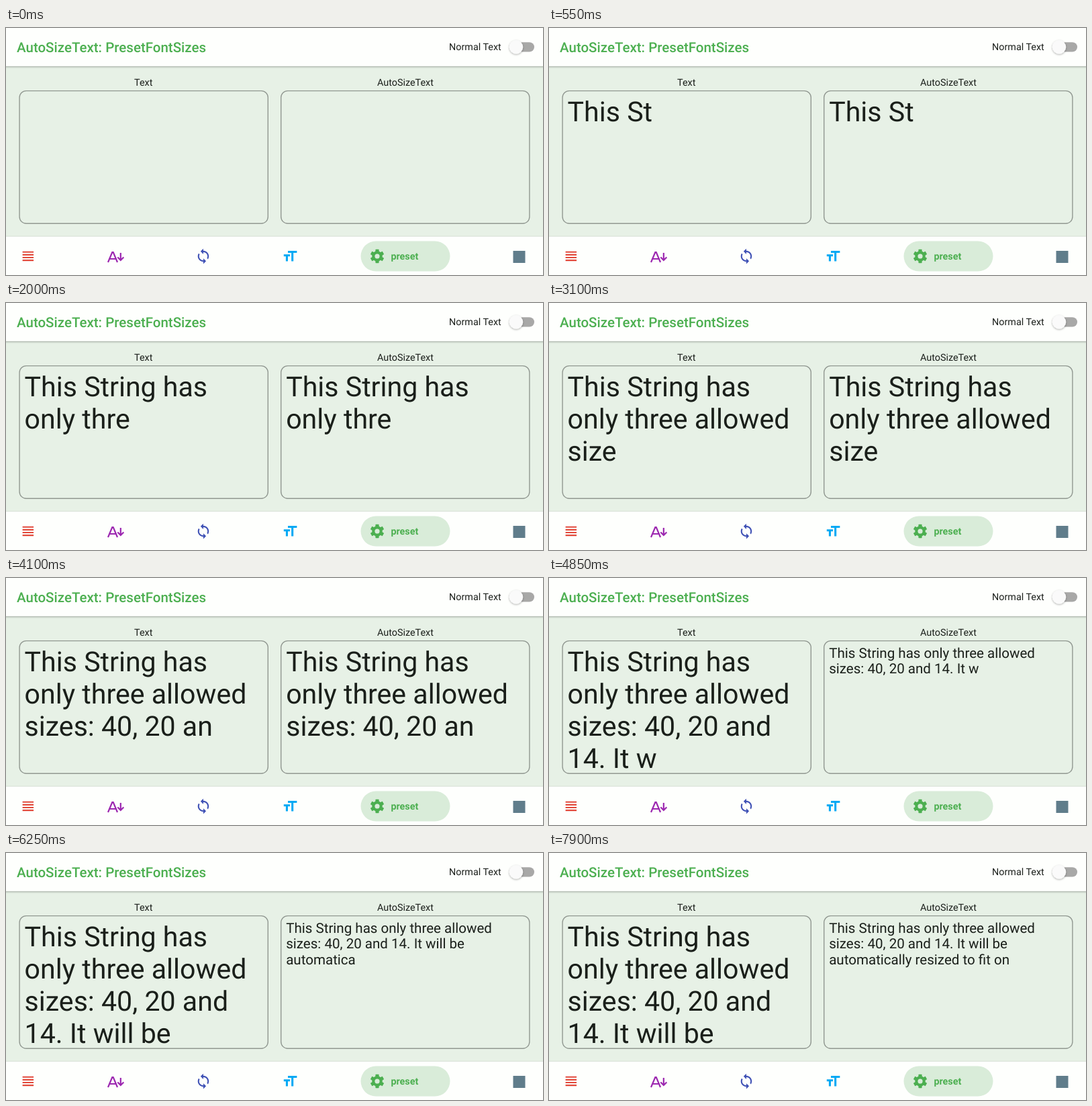
These frames come from a looping animation (800 by 368 pixels, 8 s). An HTML page:

```html
<!DOCTYPE html>
<html lang="en">
<head>
<meta charset="utf-8">
<title>AutoSizeText: PresetFontSizes</title>
<style>
html, body { margin: 0; width: 100%; height: 100%; overflow: hidden; background: #e7f1e6; }
body, svg text { font-family: Roboto, sans-serif; text-rendering: geometricPrecision; }
svg { position: absolute; left: 0; top: 0; }
svg text { font-size: 14.36px; fill: #1b1f1b; }
.typed {
  position: absolute; top: 101.5px; width: 354.7px; height: 189px;
  overflow: hidden; color: #1a1f1a; font-size: 41.1px; line-height: 48.2px;
}
.typed.small { font-size: 20.55px; line-height: 23.6px; }
#plain { left: 27.6px; }
#auto { left: 417.2px; }
</style>
</head>
<body>
<svg width="800" height="368" viewBox="0 0 800 368">
  <defs>
    <filter id="shadow" x="-20%" y="-50%" width="140%" height="200%">
      <feDropShadow dx="0" dy="1" stdDeviation="1.5" flood-opacity=".35"/>
    </filter>
  </defs>

  <rect x="-10" y="-20" width="820" height="76.8" fill="#fefffd" filter="url(#shadow)"/>
  <text x="16" y="36" style="font-size:20.5px;font-weight:500;fill:#4caf50">AutoSizeText: PresetFontSizes</text>
  <text x="660" y="33.4">Normal Text</text>
  <rect x="752" y="21.2" width="35" height="14.4" rx="7.2" fill="#a8a8a7"/>
  <circle cx="760" cy="28.4" r="10.2" fill="#fafafa" filter="url(#shadow)"/>

  <g text-anchor="middle">
    <text x="204.7" y="85.7">Text</text>
    <text x="594.9" y="85.7">AutoSizeText</text>
  </g>
  <g fill="none" stroke="#919891" stroke-width="1.4">
    <rect x="20.1" y="93.6" width="370.2" height="197.7" rx="10"/>
    <rect x="409.7" y="93.6" width="370.2" height="197.7" rx="10"/>
  </g>

  <rect y="309.5" width="800" height="2" fill="#dfe7de"/>
  <rect y="311" width="800" height="57" fill="#fefffd"/>
  <rect x="528.5" y="317.5" width="133" height="45" rx="22.5" fill="#d9ecd9"/>

  <g transform="translate(20.5 327.6) scale(1.03)">
    <path fill="#e24a3c" d="M4 5h16v2H4zM4 9h16v2H4zM4 13h16v2H4zM4 17h16v2H4z"/>
  </g>
  <g fill="none" stroke="#9c27b0" stroke-width="2.2">
    <path d="M152 349l6.3-15h1.4l6.3 15M154.5 344h9"/>
    <path d="M170.8 335v10.5M166.3 341.5l4.5 4.5 4.5-4.5"/>
  </g>
  <g transform="translate(281.6 327.7) scale(1.03)">
    <path fill="#3f51b5" d="M12 4V1L8 5l4 4V6c3.31 0 6 2.69 6 6 0 1.01-.25 1.97-.7 2.8l1.46 1.46C19.54 15.03 20 13.57 20 12c0-4.42-3.58-8-8-8zm0 14c-3.31 0-6-2.69-6-6 0-1.01.25-1.97.7-2.8L5.24 7.74C4.46 8.97 4 10.43 4 12c0 4.42 3.58 8 8 8v3l4-4-4-4v3z"/>
  </g>
  <g transform="translate(410.7 327.9) scale(1.03)">
    <path fill="#03a9f4" d="M9 4v3h5v12h3V7h5V4H9zM3 12h3v7h3v-7h3V9H3z"/>
  </g>
  <g transform="translate(553 340) scale(1.03)" fill="#4caf50">
    <circle r="7.5"/>
    <rect id="tooth" x="-2.5" y="-10" width="5" height="20" rx=".7"/>
    <use href="#tooth" transform="rotate(60)"/>
    <use href="#tooth" transform="rotate(120)"/>
    <circle r="3.5" fill="#d9ecd9"/>
  </g>
  <text x="573.4" y="345.2" style="font-weight:700;fill:#4caf50">preset</text>
  <rect x="755.5" y="332" width="18" height="18" fill="#607d8b"/>
</svg>
<div class="typed" id="plain"></div>
<div class="typed" id="auto"></div>

<script>
const MESSAGE = "This String has only three allowed sizes: 40, 20 and 14. It will be automatically resized to fit on two lines.";
const LOOP = 8000, STEP = 50, KEY_TIME = 80.3, LEAD = 55;
const plain = document.getElementById("plain");
const auto = document.getElementById("auto");
let shown = -1;

function draw(now) {
  const t = Math.floor(now % LOOP / STEP) * STEP;
  const count = Math.floor((t + LEAD) / KEY_TIME);
  if (count !== shown) {
    shown = count;
    plain.textContent = auto.textContent = MESSAGE.slice(0, count);
    // Fall back to the smaller preset once the large one overflows
    auto.classList.remove("small");
    auto.classList.toggle("small", auto.scrollHeight > auto.clientHeight);
  }
  requestAnimationFrame(draw);
}
draw(performance.now());
</script>
</body>
</html>
```
